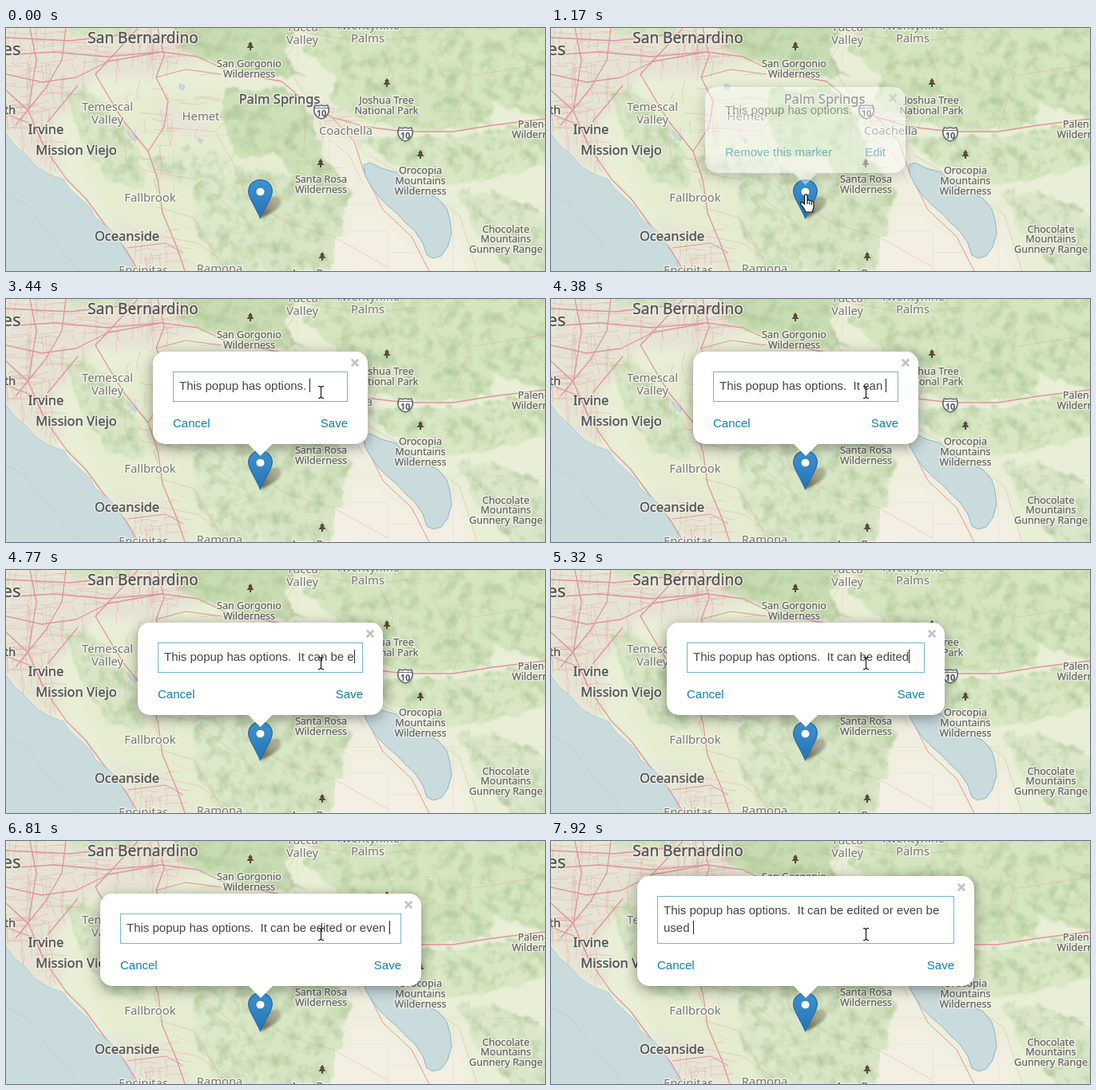
Write an HTML page that moves like this. It is 675 by 305 pixels and loops after 8000 ms.

```html
<!DOCTYPE html>
<html lang="en">
<head>
<meta charset="utf-8">
<title>Editable map popup</title>
<style>
html, body { margin: 0; width: 100%; height: 100%; overflow: hidden; background: #e9eed6; }
#stage { position: relative; width: 675px; height: 305px; overflow: hidden; }
svg { position: absolute; left: 0; top: 0; overflow: visible; }
#map { will-change: transform; overflow: hidden; }
#map text { font-family: "Noto Sans", sans-serif; text-anchor: middle; stroke-linejoin: round; }
.road { fill: none; stroke: #de9599; stroke-linejoin: round; }
.lane { fill: none; stroke: #dcaaa2; stroke-width: .8; opacity: .6; }
.edge { fill: none; stroke: #cfc6c8; stroke-width: .7; opacity: .4; }
#popup { position: absolute; bottom: 123px; padding: 25px 25px 15px; border-radius: 15px; background: #fff;
  box-shadow: 0 3.75px 17.5px rgba(0,0,0,.4); font: 15px/22px "Liberation Sans", Arial, sans-serif; color: #444; }
#tip { position: absolute; left: 50%; top: 100%; width: 30px; height: 15px; margin-left: -15px; background: #fff;
  clip-path: polygon(0 0, 100% 0, 50% 100%); }
#popup svg { left: auto; right: 10px; top: 8px; }
#field { box-sizing: border-box; white-space: pre-wrap; padding: 6px 7px 8px; border: 1px solid #c4c8ca; }
#field.focus { border-color: #74b3cf; }
#caret { border-left: 1px solid #222; margin-right: -1px; }
#row { display: flex; justify-content: space-between; margin-top: 16px; color: #0f80ae; }
.view { padding-top: 18px !important; }
.view #field { padding: 0; border: 0; }
.view #row { margin-top: 31px; }
.on { text-decoration: underline; }
</style>
</head>
<body>
<div id="stage">
<svg id="map" width="675" height="305" viewBox="0 0 675 305">
  <defs>
    <filter id="hills" x="-10%" y="-10%" width="120%" height="120%" color-interpolation-filters="sRGB">
      <feTurbulence type="fractalNoise" baseFrequency=".06" numOctaves="4" seed="8" result="n"/>
      <feDisplacementMap in="SourceGraphic" in2="n" scale="20" xChannelSelector="R" yChannelSelector="G"/>
      <feGaussianBlur stdDeviation="1.2" result="g"/>
      <feColorMatrix in="n" values="0 0 0 0 .6  0 0 0 0 .72  0 0 0 0 .52  0 1.3 0 0 -.56"/>
      <feComposite in2="g" operator="in" result="s"/>
      <feMerge><feMergeNode in="g"/><feMergeNode in="s"/></feMerge>
    </filter>
    <filter id="soft"><feGaussianBlur stdDeviation="5"/></filter>
    <filter id="haze" x="-30%" y="-30%" width="160%" height="160%"><feGaussianBlur stdDeviation="1.6"/></filter>
    <linearGradient id="pin" x2="0" y2="1"><stop stop-color="#3f93d2"/><stop offset="1" stop-color="#2373b3"/></linearGradient>
    <linearGradient id="shade" x1="0" y1="1" x2="1" y2="0"><stop stop-color="#443a30" stop-opacity=".75"/><stop offset="1" stop-color="#765" stop-opacity=".3"/></linearGradient>
    <path id="tree" d="M0-6 3-2H1.5L4.5 2H1V5H-1V2H-4.5L-1.5-2H-3Z" fill="#57493b"/>
    <g id="shield">
      <path d="M-7.5-8Q-4-6.5 0-8Q4-6.5 7.5-8Q10-4 8.8 1Q7 7 0 9Q-7 7-8.8 1Q-10-4-7.5-8Z" fill="#fff" stroke="#6d7275" stroke-width="1.8"/>
      <path d="M-8-4.5H8" stroke="#6d7275"/>
      <text y="6" font-size="11" font-weight="700" fill="#555">10</text>
    </g>
  </defs>
  <path fill="#e9eed6" d="M0 0H675V305H0Z"/>
  <g filter="url(#soft)">
    <path fill="#e5ecd0" d="M90 90 260 75 350 130 330 305 170 305 100 180Z"/>
    <path fill="#f0efdf" d="M395 110 430 130 455 185 500 245 570 250 590 305 405 305 420 230Z"/>
    <path fill="#e6e3d4" d="M0 0H225L245 40 180 62 110 60 85 95 60 120 72 180 40 178 0 130Z"/>
    <path fill="#e7e5d5" d="M380 88 420 100 445 135 425 140 385 112ZM130 240 205 255 235 305 155 305ZM185 90 260 110 250 135 190 128Z"/>
  </g>
  <g filter="url(#hills)" fill="#d5e5bf">
    <path d="M390 -10H685V120L610 92 608 122 540 128 455 118 410 95 412 60 375 30Z"/>
    <path d="M72 78 100 72 140 122 165 152 175 200 135 195 105 160Z" fill="#d9e6c6"/>
    <path fill="#c8dcb2" d="M205 -10 365 -10 350 38 372 62 300 60 262 42 220 28Z"/>
    <path d="M70 -10H160L150 10 85 8Z"/>
    <path fill="#cde0b7" d="M275 76 352 76 385 112 398 165 435 205 425 226 375 205 340 160 290 162 272 120Z"/>
    <path d="M440 140 560 136 685 118V168L600 192 552 196 480 168Z" fill="#d9e7c5"/>
    <path d="M285 172 352 184 390 200 425 226 420 255 402 315H335L300 262Z" fill="#d9e6c6"/>
    <path d="M235 200 280 180 300 232 322 315H268L240 255Z" fill="#dce8c9"/>
    <path d="M565 205 610 205 685 240V315H640L590 258Z" fill="#dce7ca"/>
    <path d="M172 165 225 150 285 160 270 190 215 196Z" fill="#dfe9ce"/>
  </g>
  <path fill="#f3efe2" d="M412 262H432V236H466L490 258 524 290 546 290 566 262 578 305H412Z"/>
  <g class="edge">
    <path d="M0 64 105 88 130 122 210 135 410 136 675 140M365 0V70L405 98V305M430 222H675M433 255H478V305M478 282H525M560 220V305M410 45H600V0M210 135V245L265 262V305"/>
  </g>
  <g id="streets"></g>
  <g class="lane">
    <path d="M200 125 262 130 292 100 330 118 388 178 420 175M262 130 285 170 300 212 352 245 410 262 478 300M170 178 235 190 300 240M160 255 240 270 290 305M190 225 235 238 268 295M395 108 365 70 350 38 372 5 450 18 520 10M460 125 470 100 485 60 470 25M455 160 500 186 568 235 590 305M560 130 580 60 675 45M405 140 430 160 447 195"/>
  </g>
  <g class="road" stroke-width="1.3">
    <path d="M0 34 60 30 125 36 195 30 240 36 280 55 345 67 375 92 408 112 450 124 500 130 560 130 610 122 675 114"/>
    <path d="M165 0 140 28 112 58 132 92 148 118 178 155 190 190 196 232 214 275 224 305"/>
    <path d="M190 0 198 35 188 62 203 92 198 124 178 155"/>
    <path d="M0 78 28 104 48 150 76 190 100 214 122 244 150 278 166 305"/>
    <path d="M0 58 45 68 88 62 128 42 195 30M0 12 80 16 150 8 225 15M30 0 38 40 28 104M75 0 70 40 50 75 12 122M0 108 36 122 48 150M52 118 90 72"/>
    <path d="M152 276 200 270 222 282M188 62 225 52 270 58M408 112 436 142 448 180 472 228 508 262 530 305" stroke-width="1"/>
  </g>
  <g fill="#c9dbdd">
    <path stroke="#a9c4ca" stroke-width=".7" d="M-1 131 10 146 25 159 38 174 55 184 72 190 80 202 92 213 105 225 112 238 130 252 140 263 148 277 157 291 161 306H-1Z"/>
    <path stroke="#8db6c3" stroke-width="1" d="M448 172 456 169 470 176 488 181 504 196 526 207 541 214 552 227 556 241 558 258 553 275 545 286 535 289 527 285 522 270 512 255 500 244 490 233 478 223 467 212 458 200 450 186Z"/>
    <path stroke="#9cc0ca" stroke-width=".7" d="M152 128 158 134 164 139 160 141 153 134ZM218 70 224 73 222 78 217 75ZM240 138 247 141 243 145Z"/>
  </g>
  <path d="M0 208 25 222 50 255 75 285 92 305" fill="none" stroke="#b5cfd6" stroke-width=".8"/>
  <g id="labels"></g>
  <use href="#tree" x="306" y="23"/><use href="#tree" x="477" y="69"/><use href="#tree" x="394" y="170"/>
  <use href="#tree" x="519" y="159"/><use href="#tree" x="396" y="287"/>
  <use href="#shield" x="395" y="105"/><use href="#shield" x="500" y="133"/>
  <path d="M318 239Q321 222 331 213Q343 209 345 218Q344 228 318 239Z" fill="url(#shade)" filter="url(#haze)"/>
  <g transform="translate(303 190) scale(1.24 1.2)">
    <path d="M12.5.5C5.8.5.5 5.8.5 12.5C.5 19 4.5 22.5 12.5 40.5C20.5 22.5 24.5 19 24.5 12.5C24.5 5.8 19.2.5 12.5.5Z" fill="url(#pin)" stroke="#2a6da6"/>
    <circle cx="12.5" cy="12.9" r="4.4" fill="#fff" stroke="#2a6da6" stroke-width=".6"/>
  </g>
</svg>
<div id="popup">
  <div id="tip"></div>
  <svg width="12" height="12"><path d="M1.8 1.8 10.2 10.2M10.2 1.8 1.8 10.2" stroke="#c3c3c3" stroke-width="2.7"/></svg>
  <div id="field"><span id="text"></span><span id="caret"></span></div>
  <div id="row"><span id="left"></span><span id="right"></span></div>
</div>
<svg id="cursor" width="20" height="26">
  <path id="grab" d="M-5 7C-7 3-9 1-7.5-.5C-6-1.5-5 .5-4 1.5V-5C-4-7-1.5-7-1.5-5C-1.5-8 1-8 1-5.5C1-7.5 3.5-7.5 3.5-5C3.5-6 6-6 6-4V2C6 4 5 5 4.5 8H-4.5Z" fill="#fff" stroke="#111"/>
  <path id="hand" d="M-1.5 1.5C-1.5-.8 2-.8 2 1.5V8C2 6.5 4.8 6.5 4.8 8.3C5 7.2 7.4 7.4 7.4 9.2C7.8 8.3 10 8.5 10 10.5V15C10 18 8.5 18.5 8.5 22H-.5C-.5 19-3 17-6 12.5C-7.5 10-4.8 8.6-3 10.6L-1.5 12ZM2 8V12M4.8 9V12.5M7.4 10V13" fill="#fff" stroke="#111" stroke-width="1.2"/>
  <path id="beam" d="M-3-7.5H-1L.5-6 2-7.5H4M.5-6V6M-3 7.5H-1L.5 6 2 7.5H4" fill="none" stroke="#111" stroke-width="1.1"/>
</svg>
</div>
<script>
const $ = id => document.getElementById(id);
const LOOP = 8000, FRAME = 78.7, CENTER = 319;

// Map labels: text, centre x, middle y, size, colour, extra weight
const label = (text, x, y, size, color, bold = 0) => {
  const attrs = `x="${x}" y="${y + size * .34}" font-size="${size}"`;
  $('labels').innerHTML +=
    `<text ${attrs} fill="none" stroke="#f8f8ee" stroke-width="3" opacity=".75">${text}</text>` +
    `<text ${attrs} fill="${color}" stroke="${color}" stroke-width="${bold}">${text}</text>`;
};
const city = (text, x, y, size = 16.5) => label(text, x, y, size, '#555', .45);
const town = (text, x, y) => label(text, x, y, 14.8, '#777');
const park = (x, y, ...lines) => lines.forEach((s, i) => label(s, x, y + i * 12.8, 12.6, '#666', .25));

city('San Bernardino', 171.5, 12.5, 19);
city('es', 7, 27, 22);
city('th', 5, 103, 15);
city('Irvine', 50, 127);
city('Mission Viejo', 88, 153.5);
city('Oceanside', 151.5, 261);
city('Palm Springs', 342.5, 89.5);
town('Temescal', 127, 99); town('Valley', 127, 115);
town('Hemet', 244, 111);
town('Fallbrook', 180.5, 212.5);
town('Coachella', 425.5, 129);
town('Encinitas', 172, 304);
town('Ramona', 267.5, 302);
town('Yucca', 371, -1); town('Valley', 371, 14.5);
town('Twentynine', 453, -3.5); town('Palms', 453, 12.5);
park(304.5, 44.6, 'San Gorgonio', 'Wilderness');
park(476.5, 91, 'Joshua Tree', 'National Park');
park(394.5, 190, 'Santa Rosa', 'Wilderness');
park(519, 179, 'Orocopia', 'Mountains', 'Wilderness');
park(626, 252.3, 'Chocolate', 'Mountains', 'Gunnery Range');
park(679, 121, 'Palen-McCoy');
park(666, 133.5, 'Wilderness');
park(397, 308, 'Anza Borrego');

// Seeded street networks: x, y, width, height, count
let seed = 41;
const rnd = () => (seed = seed * 16807 % 2147483647) / 2147483647;
const streets = (x, y, w, h, count) => {
  let d = '';
  for (let i = 0; i < count; i++) {
    const flat = i % 2, step = 4 + rnd() * 7;
    let px = x + rnd() * w, py = y + rnd() * h;
    d += `M${px.toFixed(1)} ${py.toFixed(1)}`;
    for (let k = 0; k < 4; k++) {
      px += flat ? step : (rnd() - .5) * 5;
      py += flat ? (rnd() - .5) * 5 : step;
      d += `L${px.toFixed(1)} ${py.toFixed(1)}`;
    }
  }
  $('streets').innerHTML += `<path class="lane" d="${d}"/>`;
};
streets(-10, -10, 235, 55, 85);
streets(-20, 40, 95, 65, 45);
streets(0, 95, 60, 40, 20);
streets(35, 140, 30, 20, 8);
streets(150, 55, 100, 75, 22);
streets(150, 255, 50, 40, 18);
streets(165, 140, 30, 60, 8);
streets(375, 90, 45, 35, 10);

// Typed characters by time
const START = 'This popup has options. ';
const keys = [[3600, ' '], [3750, 'I'], [3830, 't'], [3980, ' '], [4060, 'c'], [4140, 'a'], [4220, 'n'],
  [4380, ' '], [4530, 'b'], [4610, 'e'], [4690, ' '], [4770, 'e'], [4930, 'd'], [5010, 'i'], [5090, 't'],
  [5165, 'e'], [5240, 'd'], [5320, ''], [5780, ' '], [5860, 'o'], [5940, 'r '], [6100, 'e'], [6180, 'v'],
  [6260, 'e'], [6340, 'n'], [6810, ' '], [7200, 'b'], [7360, 'e'], [7440, ' '], [7600, 'u'], [7680, 's'],
  [7760, 'e'], [7920, 'd ']];
const pen = document.createElement('canvas').getContext('2d');
pen.font = '15px "Liberation Sans", Arial, sans-serif';

const path = [[290, 404, 278], [450, 338, 226], [530, 300, 204], [610, 319, 214], [770, 319, 222], [930, 319, 209],
  [1290, 319, 209], [1560, 324, 160], [1630, 334, 159], [1865, 404, 159], [2330, 404, 159], [2970, 394, 117]];
const at = t => {
  const i = path.findIndex(p => p[0] > t);
  if (i < 0) return path[path.length - 1].slice(1);
  const [a, b] = [path[Math.max(0, i - 1)], path[i]];
  const k = Math.max(0, (t - a[0]) / (b[0] - a[0] || 1));
  return [1, 2].map(n => Math.round(a[n] + (b[n] - a[n]) * k));
};
const show = (el, on) => { el.style.display = on ? '' : 'none'; };

function drawPopup(t) {
  const edit = t >= 2180, popup = $('popup');
  show(popup, t >= 1090);
  popup.style.opacity = t < 1165 ? .1 : t < 1250 ? .45 : t < 1330 ? .85 : 1;
  popup.className = edit ? '' : 'view';
  let text = START, before = START;
  for (const [time, s] of keys) {
    if (t < time) break;
    before = text;
    text += s;
  }
  // The box follows the typing one keystroke late
  const width = edit ? Math.min(372, Math.max(219, Math.round(pen.measureText(before).width + 28))) : 201;
  $('field').style.width = width + 'px';
  $('field').className = t >= 3440 ? 'focus' : '';
  popup.style.left = Math.floor(CENTER - width / 2 - 25) + 'px';
  $('text').textContent = text;
  show($('caret'), t >= 3440);
  $('left').textContent = edit ? 'Cancel' : 'Remove this marker';
  $('right').textContent = edit ? 'Save' : 'Edit';
  $('left').className = t >= 1540 && t < 1720 ? 'on' : '';
  $('right').className = t >= 1860 && t < 2450 ? 'on' : '';
}

function drawCursor(t) {
  const [x, y] = at(290 + Math.floor((t - 290) / FRAME + .02) * FRAME);
  const kind = t < 600 ? 'grab' : t < 2560 ? 'hand' : 'beam';
  show($('cursor'), t >= 290);
  $('cursor').style.transform = `translate(${x}px,${y}px)`;
  for (const id of ['grab', 'hand', 'beam']) show($(id), id === kind);
}

const begin = performance.now();
function tick() {
  const t = (performance.now() - begin) % LOOP;
  drawPopup(t);
  drawCursor(t);
  requestAnimationFrame(tick);
}
tick();
</script>
</body>
</html>
```
